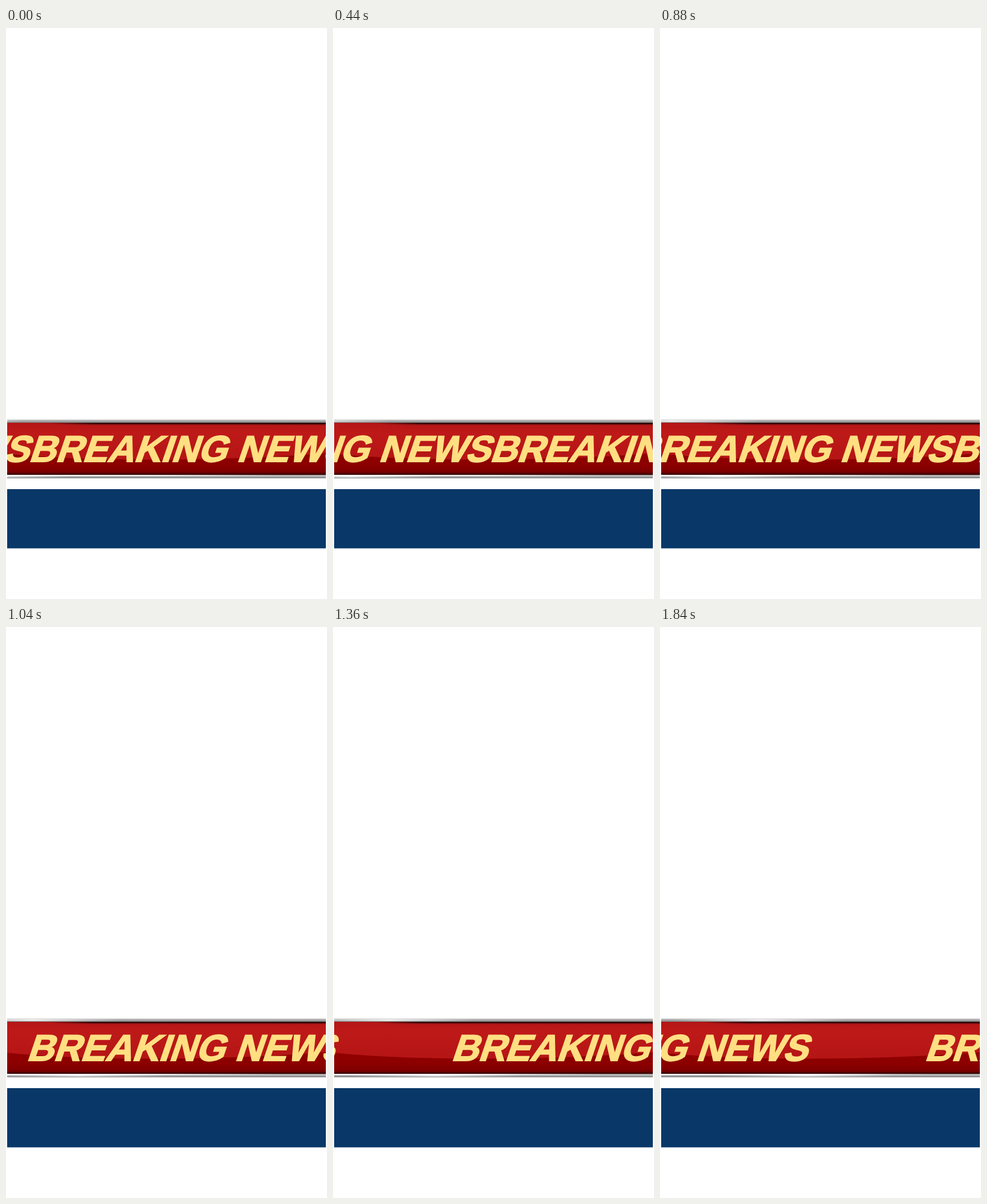
An HTML page with a canvas for the animation above (1880 ms loop, 561 by 998 pixels).

```html
<!DOCTYPE html>
<html lang="en">
<head>
<meta charset="utf-8">
<title>Breaking news</title>
<style>
html, body { margin: 0; width: 100%; height: 100%; overflow: hidden; background: #fff; }
canvas { display: block; }
</style>
</head>
<body>
<canvas id="stage" width="561" height="998"></canvas>
<script>
const ctx = document.getElementById('stage').getContext('2d');
const LEFT = 2, RIGHT = 559, WIDTH = RIGHT - LEFT;
const LOOP = 1880, STEP = 40;
const TEXT = 'BREAKING NEWS';
const STARTS = [600, 42, -516, -1279];
const TEXT_SPEED = 0.533, SLANT = 0.34, WEIGHT = 2;
const FLASH_SPEED = 2.75, FLASH_PERIOD = 1500, FLASH_HALF = 167;

// Fills a rectangle with a linear gradient; stops are [offset, colour] pairs.
function band(x, y, w, h, stops, vertical = true) {
  const g = vertical ? ctx.createLinearGradient(0, y, 0, y + h)
                     : ctx.createLinearGradient(x, 0, x + w, 0);
  for (const [at, colour] of stops) g.addColorStop(at, colour);
  ctx.fillStyle = g;
  ctx.fillRect(x, y, w, h);
}

const white = a => `rgba(255,255,255,${a})`;
const black = a => `rgba(0,0,0,${a})`;

function panel() {
  band(LEFT, 690, WIDTH, 91, [[0, '#b51616'], [0.2, '#be1919'], [0.7, '#b51515'], [1, '#a80e0e']]);
  const g = ctx.createLinearGradient(0, 745, 0, 781);
  g.addColorStop(0, '#920000');
  g.addColorStop(0.6, '#8a0000');
  g.addColorStop(1, '#720000');
  ctx.fillStyle = g;
  ctx.beginPath();
  ctx.moveTo(LEFT, 744);
  ctx.bezierCurveTo(130, 758, 380, 758, RIGHT, 743);
  ctx.lineTo(RIGHT, 781);
  ctx.lineTo(LEFT, 781);
  ctx.fill();
}

function edges() {
  const fade = [[0, black(0)], [0.13, black(0.05)], [0.27, black(0.75)], [1, black(0.8)]];
  band(LEFT, 690, WIDTH, 2, fade, false);
  band(LEFT + 80, 692, WIDTH - 80, 2, [[0, black(0)], [0.15, black(0.3)], [1, black(0.35)]], false);
  band(LEFT, 776, WIDTH, 5, [[0, black(0)], [1, black(0.6)]]);
}

function flash(t) {
  const phase = (t - 200 + FLASH_PERIOD / 2) % FLASH_PERIOD - FLASH_PERIOD / 2;
  const centre = 345 + phase * FLASH_SPEED;
  const ramp = [[0, 0], [45, 0.4], [64, 0.7], [75, 1]];
  const stops = ramp.flatMap(([d, a]) => {
    const at = d / (2 * FLASH_HALF);
    return [[at, white(a)], [1 - at, white(a)]];
  });
  const x = centre - FLASH_HALF, w = 2 * FLASH_HALF;
  band(x, 694, w, 83, stops, false);
  ctx.globalAlpha = 0.45;
  band(x, 690, w, 4, stops, false);
  band(x, 777, w, 4, stops, false);
  ctx.globalAlpha = 1;
}

function rails(t) {
  band(LEFT, 684, WIDTH, 6, [[0, '#e6e6e6'], [0.3, '#b4b4b4'], [0.7, '#999'], [1, '#777']]);
  band(LEFT, 781, WIDTH, 6, [[0, '#a0a0a0'], [0.3, '#bbb'], [0.65, '#a6a6a6'], [1, '#707070']]);
  band(LEFT, 781, WIDTH, 2, [[0, white(1)], [0.5, white(0.8)], [0.85, white(0)], [1, white(0)]], false);
  // Soft highlight drifting along both metal rails.
  const glow = [[0, white(0)], [0.5, white(0.75)], [1, white(0)]];
  const x = -270 + t * 0.16;
  band(x, 685, 300, 4, glow, false);
  band(x + 80, 781, 300, 5, glow, false);
}

function ticker(t) {
  ctx.font = 'bold 64.8px "Liberation Sans", Arial, sans-serif';
  ctx.fillStyle = ctx.strokeStyle = '#ffdf82';
  ctx.lineWidth = WEIGHT;
  const bearing = ctx.measureText('B').actualBoundingBoxLeft + WEIGHT / 2;
  ctx.save();
  ctx.translate(bearing + t * TEXT_SPEED, 758);
  ctx.transform(1, 0, -SLANT, 1, 0, 0);
  for (const x of STARTS) {
    ctx.fillText(TEXT, x, 0);
    ctx.strokeText(TEXT, x, 0);
  }
  ctx.restore();
}

function draw(now) {
  const t = Math.floor(now % LOOP / STEP) * STEP;
  ctx.fillStyle = '#fff';
  ctx.fillRect(0, 0, 561, 998);
  ctx.save();
  ctx.beginPath();
  ctx.rect(LEFT, 684, WIDTH, 104);
  ctx.clip();
  panel();
  edges();
  flash(t);
  rails(t);
  ticker(t);
  ctx.restore();
  ctx.fillStyle = '#093868';
  ctx.fillRect(LEFT, 806, WIDTH, 103.5);
}

function frame() {
  draw(performance.now());
  requestAnimationFrame(frame);
}
frame();
</script>
</body>
</html>
```
